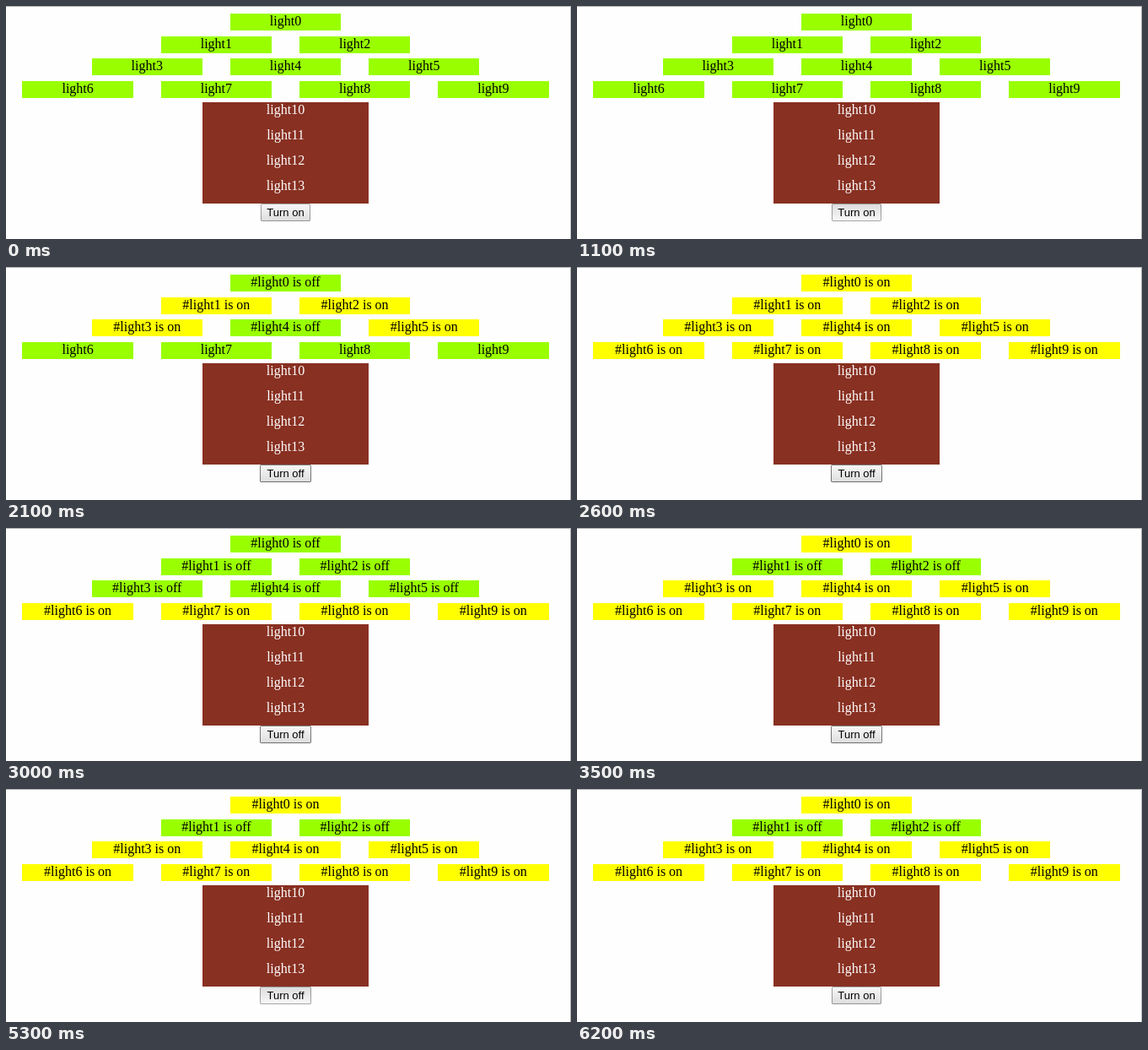
An HTML page that plays this animation: 670x276 px, repeating every 6300 ms.

```html
<!DOCTYPE html>
<html lang="en">
<head>
<meta charset="utf-8">
<title>Lights</title>
<style>
  html, body { margin: 0; width: 100%; height: 100%; overflow: hidden; background: #fefefe; }
  svg { display: block; }
  text { text-anchor: middle; font: 16px "Liberation Serif", "Times New Roman", serif; }
  #button text { font: 13px "Liberation Sans", Arial, sans-serif; }
</style>
</head>
<body>
<svg id="stage" width="670" height="276" viewBox="0 0 670 276">
  <defs>
    <linearGradient id="raised" x2="0" y2="1">
      <stop stop-color="#f8f8f8"/><stop offset="1" stop-color="#ddd"/>
    </linearGradient>
    <linearGradient id="sunken" x2="0" y2="1">
      <stop stop-color="#ddd"/><stop offset="1" stop-color="#f8f8f8"/>
    </linearGradient>
  </defs>
  <rect width="670" height="276" fill="#fefefe"/>
  <rect width="670" height="1" fill="#b4b4b4"/>
  <rect id="edge" x="669" width="1" height="276"/>
  <g id="lights"></g>
  <rect x="233" y="114" width="197" height="120" fill="#883022"/>
  <g id="trunk" fill="#fff"></g>
  <g id="button">
    <rect y="234" height="21" rx="1.5"/>
    <rect y="234.5" height="20" rx="1" fill="none" stroke="#000"/>
    <text x="331.5" y="249"></text>
  </g>
</svg>
<script>
const LOOP = 6300, CENTER = 331.5, PITCH = 164.25, WIDTH = 131.4;
const ROW_TOPS = [9, 36, 62, 89];

// Each timer toggles its lights, starting from unlit.
const timers = [
  { ids: [0, 4], at: [1700, 2100, 2600, 3000, 3500, 4000, 4400, 4900, 5300] },
  { ids: [1, 2], at: [2100, 3000, 4000, 4900] },
  { ids: [3, 5], at: [1900, 2700, 3400, 4100, 4900] },
  { ids: [6, 7, 8, 9], at: [2600, 4000, 5300] }
];

const buttonSteps = [
  [0, "Turn on", "idle"],
  [300, "Turn on", "hover"],
  [1100, "Turn on", "pressed"],
  [1200, "Turn off", "hover"],
  [5300, "Turn off", "pressed"],
  [5400, "Turn on", "hover"],
  [5700, "Turn on", "idle"]
];

const byId = id => document.getElementById(id);

function add(parent, tag, attrs) {
  const el = document.createElementNS("http://www.w3.org/2000/svg", tag);
  set(el, attrs);
  return parent.appendChild(el);
}

function set(el, attrs) {
  for (const key in attrs) el.setAttribute(key, attrs[key]);
}

const lights = [];
ROW_TOPS.forEach((top, row) => {
  for (let i = 0; i <= row; i++) {
    const mid = CENTER + (i - row / 2) * PITCH;
    const left = Math.round(mid - WIDTH / 2);
    const right = Math.round(mid + WIDTH / 2);
    lights.push({
      box: add(byId("lights"), "rect", { x: left, y: top, width: right - left, height: 20 }),
      label: add(byId("lights"), "text", { x: mid, y: top + 14 })
    });
  }
});

for (let i = 0; i < 4; i++) {
  add(byId("trunk"), "text", { x: CENTER, y: 128 + i * 30 }).textContent = "light" + (10 + i);
}

const [face, border, caption] = byId("button").children;

function drawButton(t) {
  const [, text, state] = buttonSteps.filter(step => step[0] <= t).pop();
  const width = text === "Turn on" ? 59 : 61;
  const left = text === "Turn on" ? 302 : 301;
  set(face, { x: left, width, fill: state === "pressed" ? "url(#sunken)" : "url(#raised)" });
  set(border, { x: left + 0.5, width: width - 1, "stroke-opacity": state === "hover" ? 0.5 : 0.333 });
  caption.textContent = text;
}

function draw(t) {
  for (const { ids, at } of timers) {
    const count = at.filter(time => time <= t).length;
    const lit = count % 2 === 1;
    for (const id of ids) {
      const { box, label } = lights[id];
      set(box, { fill: lit ? "#ff0" : "#9f0" });
      label.textContent = count ? `#light${id} is ${lit ? "on" : "off"}` : "light" + id;
    }
  }
  set(byId("edge"), { fill: t >= 1100 && t < 6200 ? "#b4b4b4" : "#c4c8ce" });
  drawButton(t);
}

const start = performance.now();
function tick() {
  draw((performance.now() - start) % LOOP);
  requestAnimationFrame(tick);
}
tick();
</script>
</body>
</html>
```
